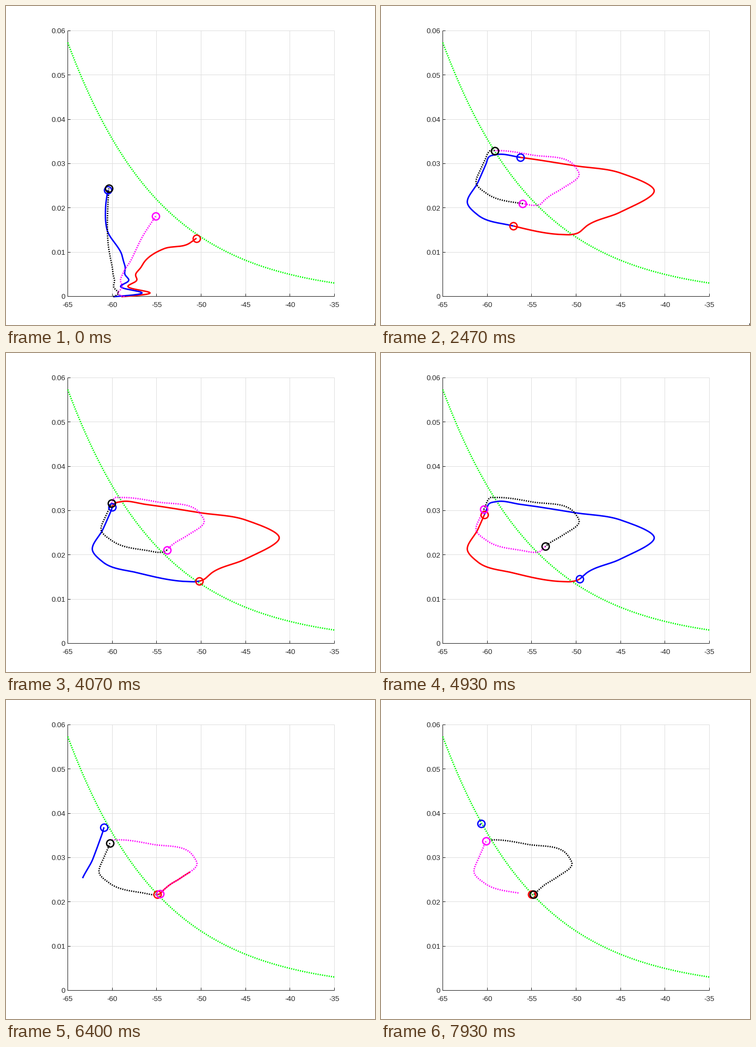
These frames come from a looping animation (678x586 px, 8000 ms). A matplotlib script:

```python
import numpy as np
import matplotlib.pyplot as plt
from matplotlib.animation import FuncAnimation
from matplotlib.patches import Rectangle

W, H, DPI = 678, 586, 128
PX = 72 / DPI                 # one pixel in points
FRAMES, LOOP_MS = 120, 8000
PERIOD, TRAIL, BIRTH = 28, 14, -9.2
SHIFT = 74                    # when the cycles start to change
INK = "#262626"
DOTS = (0, (0.75, 0.8))
LEFT, RIGHT, TOP, BOTTOM = 113.5, 603.5, 45.5, 533.5


def slopes(k, v, monotone=False):
    h = np.diff(k)
    d = np.diff(v) / h
    if monotone:
        inner = 2 * d[:-1] * d[1:] / (d[:-1] + d[1:])
    else:
        inner = (h[1:] * d[:-1] + h[:-1] * d[1:]) / (h[:-1] + h[1:])
    return np.concatenate([d[:1], inner, d[-1:]])


def spline(k, v, monotone=False):
    k, v = np.asarray(k, float), np.asarray(v, float)
    m = slopes(k, v, monotone)

    def value(t):
        i = np.clip(np.searchsorted(k, t, "right") - 1, 0, len(k) - 2)
        h = k[i + 1] - k[i]
        u = (t - k[i]) / h
        return ((1 - u) ** 2 * ((1 + 2 * u) * v[i] + u * h * m[i])
                + u * u * ((3 - 2 * u) * v[i + 1] + (u - 1) * h * m[i + 1]))
    return value


def curve(points):
    """Smooth path through (time, x, y), timed along its own length."""
    t, x, y = np.array(points, float).T
    s = np.concatenate([[0], np.cumsum(np.hypot(np.diff(x), np.diff(y)))])
    length, fx, fy = spline(t, s, True), spline(s, x), spline(s, y)

    def at(time):
        q = length(time)
        return np.array([fx(q), fy(q)])
    return at


def cycle(points):
    path = curve([(p + PERIOD * n, x, y)
                  for n in (-1, 0, 1) for p, x, y in points])
    return lambda phase: path(np.mod(phase, PERIOD))


def column(x, y):
    return np.array([[x], [y]])


big = cycle([
    (0, 349, 420), (1, 337, 420), (3, 243, 404), (4.3, 178, 384),
    (5.4, 159, 363), (7.7, 178, 324), (12, 193, 290), (14, 198.5, 277),
    (15.7, 212, 273), (17, 256, 278), (17.9, 357, 293.5), (18.5, 441, 307),
    (19.1, 502, 339), (20.4, 440, 378.5), (22.4, 380, 402.5), (26, 360.5, 417.5),
])
small = cycle([
    (0, 292.5, 364.5), (1.5, 286, 366), (3, 260.5, 363), (5.3, 195, 345),
    (6.7, 175, 326), (9.3, 184, 298), (12, 191.5, 282), (14, 196, 271),
    (15.5, 200, 266), (17, 208.5, 265.5), (18.5, 277, 273.5), (19.6, 356, 294),
    (20.2, 364, 308), (21.45, 335, 334), (23.3, 310, 349), (26, 298.5, 358.5),
])


def small_late(phase):
    return small(phase) * column(0.95, 1) + column(5, -8.5)


def big_late(phase):
    return big(phase) * column(1.14, 1.36) - column(43.3, 148.7)


# Phase gained over time once the pace changes: each half turn of the
# small cycle ends in a wait, the big cycle comes to rest
WAIT = [(0, 1.5), (2, 3), (10.8, 12), (14, 14), (17, 15.1)]
SLOWING = [(82 + 20 * k + t, 76 + 14 * k + p) for k in range(3) for t, p in WAIT]
REST_LOW = [(77.5, 79.3), (82, 82.9), (85.7, 87.2), (96, 91.2), (119, 91.5)]
REST_HIGH = [(78, 80.9), (82, 82.1), (84.5, 84), (87.6, 86.6), (92.5, 89),
             (119, 90.2)]


def make_cell(loop, late, phase0, pace, intro, wobble):
    """Return a function of time giving stage x and y of one cell."""
    gain = spline(*zip((0, 0), (SHIFT - 1, SHIFT - 1), (SHIFT, SHIFT), *pace), True)
    rise = curve(intro)
    gap = rise(np.zeros(1)) - loop(np.array([phase0]))

    def at(t):
        later = np.maximum(t, 0)
        phase = phase0 + gain(later)
        s = np.clip((t - SHIFT) / 6, 0, 1)
        s = s * s * (3 - 2 * s)
        turn = (1 - s) * loop(phase) + s * late(phase) + gap * np.exp(-later / 4)

        # damped sideways ringing on the way up from the axis
        x, y = rise(np.minimum(t, 0))
        u = 534 - y - 8
        x = x + wobble * np.exp(-u / 13) * np.cos(2 * np.pi * u / 24)
        return np.where(t < 0, [x, y], turn)
    return at


CELLS = [
    ("#ff0000", "-", make_cell(
        big, small_late, -6, REST_LOW,
        [(BIRTH, 237, 534), (-7.4, 236, 503), (-6.3, 246, 482), (-5.3, 262, 462),
         (-4.3, 290, 446), (-3, 335, 437), (0, 350, 426.5)], 27)),
    ("#0000ff", "-", make_cell(
        big, big_late, 8, REST_HIGH,
        [(BIRTH, 222, 534), (-8, 221, 502), (-6.1, 212, 455), (-4.2, 186, 412),
         (-2.1, 183, 370), (0, 187, 338)], 27)),
    ("#ff00ff", DOTS, make_cell(
        small, small_late, -6, SLOWING,
        [(BIRTH, 212, 534), (-7.4, 213, 495), (-6.1, 229, 468), (-3.9, 250, 425),
         (0, 275, 386)], -6)),
    ("#000000", DOTS, make_cell(
        small, small_late, 8, SLOWING,
        [(BIRTH, 202, 534), (-7.1, 196, 485), (-5.3, 188, 440), (-2.1, 187, 370),
         (0, 189, 335)], 5)),
]


def to_x(v):
    return LEFT + (RIGHT - LEFT) * (v + 65) / 30


def to_y(w):
    return BOTTOM + (TOP - BOTTOM) * w / 0.06


def pixel(a):
    return np.floor(a) + 0.5


fig = plt.figure(figsize=(W / DPI, H / DPI), dpi=DPI, facecolor="white")
ax = fig.add_axes([0, 0, 1, 1])
ax.set_xlim(0, W)
ax.set_ylim(H, 0)
ax.axis("off")


def rule(x, y, color):
    ax.plot(x, y, color=color, lw=PX, solid_capstyle="butt", snap=False, zorder=1)


vs = np.arange(-65, -34, 5)
ws = np.arange(7) / 100
font = dict(family="Liberation Sans", size=13.33 * PX, color=INK, va="baseline")

for v in vs[1:]:
    rule([pixel(to_x(v))] * 2, [TOP, BOTTOM], "#dfdfdf")
for w in ws[1:]:
    rule([LEFT, RIGHT], [pixel(to_y(w))] * 2, "#dfdfdf")
for v in vs:
    rule([pixel(to_x(v))] * 2, [BOTTOM - 5, BOTTOM], INK)
    ax.text(to_x(v), 553, f"{v}", ha="center", **font)
for w in ws:
    rule([LEFT, LEFT + 5], [pixel(to_y(w))] * 2, INK)
    ax.text(109, to_y(w) + 5, f"{w:g}", ha="right", **font)
rule([LEFT, LEFT], [TOP, BOTTOM + 0.5], INK)
rule([LEFT, RIGHT], [BOTTOM, BOTTOM], INK)

v = np.linspace(-65, -35, 300)
ax.plot(to_x(v), to_y(1 / (1 + np.exp((v + 93) / 10))), color="#00ff00",
        lw=2.67 * PX, ls=DOTS, dash_capstyle="butt", zorder=2)

speck = ax.add_patch(Rectangle((677, 583), 1, 3, color="black", lw=0))

trails, rings = [], []
for z, (color, style, _) in enumerate(CELLS):
    trails += ax.plot([], [], color=color, lw=2.67 * PX, ls=style,
                      solid_capstyle="butt", dash_capstyle="butt",
                      solid_joinstyle="round", zorder=3 + z)
    rings += ax.plot([], [], "o", ms=13.33 * PX, mfc="none", mec=color,
                     mew=2.5 * PX, snap=False, zorder=8 + z)


def draw(n):
    start = max(n - TRAIL, BIRTH)
    time = np.linspace(start, n, int((n - start) / 0.04) + 1)
    for (_, _, at), trail, ring in zip(CELLS, trails, rings):
        x, y = at(time)
        trail.set_data(x, y)
        # at n = 0 the ringing has died out, so the end point is the cell
        ring.set_data(x[-1:], y[-1:])
    speck.set_visible(n < 44)
    return trails + rings + [speck]


anim = FuncAnimation(fig, draw, frames=FRAMES, interval=LOOP_MS / FRAMES,
                     repeat=True, repeat_delay=0, blit=False)
plt.show()
```
